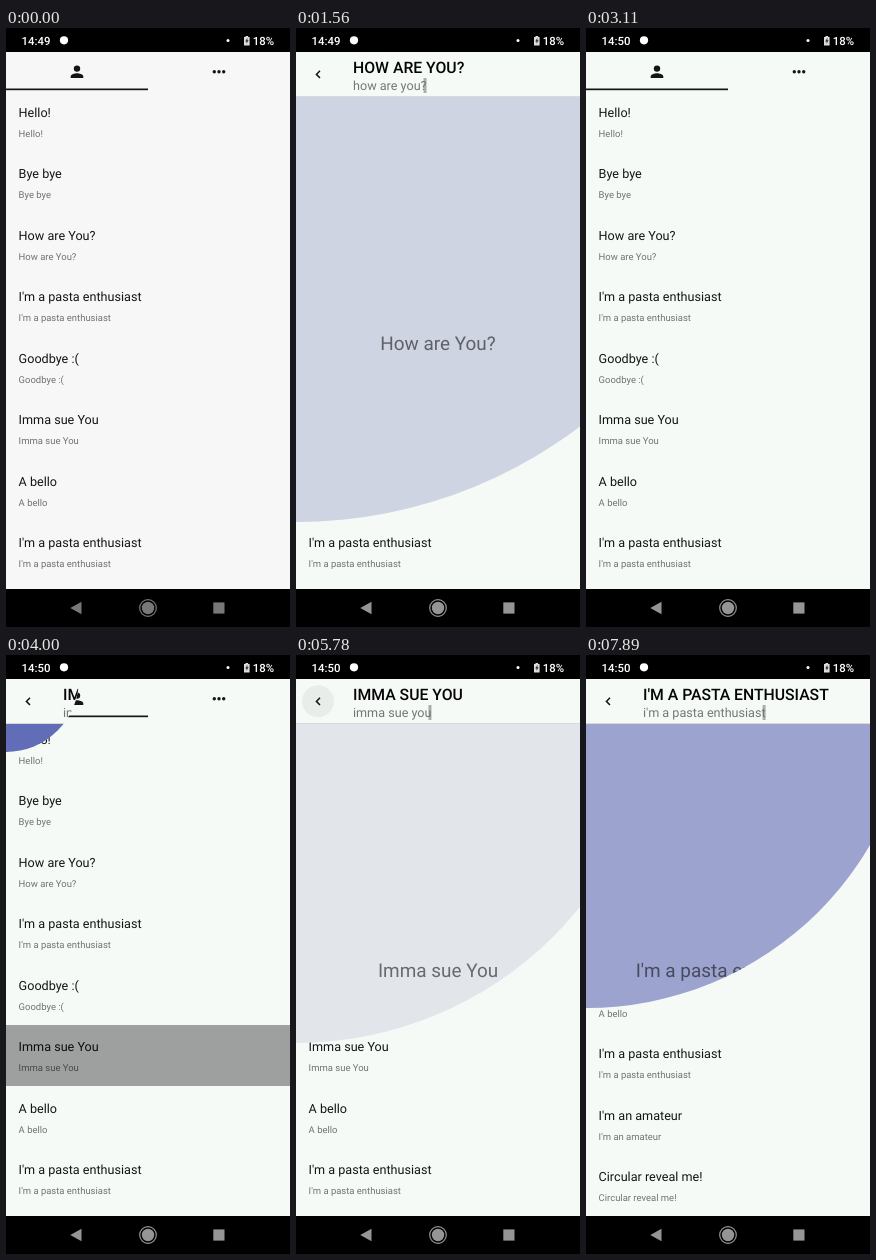
Recreate the animation shown at these times as an HTML page with a canvas. Size 284 by 599 pixels, loop 8000 ms.

```html
<!DOCTYPE html>
<html lang="en">
<head>
<meta charset="utf-8">
<title>Circular reveal</title>
<style>
html, body { margin: 0; overflow: hidden; background: #000; }
canvas { display: block; }
</style>
</head>
<body>
<canvas id="stage" width="284" height="599"></canvas>
<script>
const c = document.getElementById('stage').getContext('2d');
const LOOP = 8000, FPS = 9, W = 284, TOP = 24, BOTTOM = 561;
const ROW = 61.5, LIST_TOP = 62.5, FULL = 528;
const INK = '#141615', SOFT = 'rgba(0,0,0,.54)', NAV = '#959595';
const ROWS = ['Hello!', 'Bye bye', 'How are You?', "I'm a pasta enthusiast", 'Goodbye :(',
  'Imma sue You', 'A bello', "I'm a pasta enthusiast", "I'm an amateur", 'Circular reveal me!'];

// Each visit: tapped row, step of the tap, step at which the way back begins
const VISITS = [
  { row: 2, open: 8, close: 22 },
  { row: 5, open: 34, close: 50 },
  { row: 7, open: 68, close: 99 },
];
const OPEN_R = [0, 0, 73, 329, 390, 434, 470, 503, FULL];
const CLOSE_R = [FULL, 490, 364, 250, 150, 60, 0];
const PRESS = [.12, .3, .36];

const mix = (a, b, m) => `rgb(${a.map((v, i) => Math.round(v + (b[i] - v) * m))})`;

function rect(x, y, w, h, color) {
  c.fillStyle = color;
  c.fillRect(x, y, w, h);
}
function disc(x, y, r, color) {
  c.fillStyle = color;
  c.beginPath();
  c.arc(x, y, r, 0, 7);
  c.fill();
}
function shape(d, color) {
  c.fillStyle = color;
  c.fill(new Path2D(d));
}
function text(s, x, y, size, color, weight = 400, align = 'left') {
  c.font = `${weight} ${size}px Roboto, sans-serif`;
  c.textAlign = align;
  c.fillStyle = color;
  c.fillText(s, x, y);
}
function clipped(path, draw) {
  c.save();
  c.beginPath();
  path();
  c.clip();
  draw();
  c.restore();
}

function drawList(scroll, pressed, alpha, glow) {
  clipped(() => c.rect(0, LIST_TOP, W, BOTTOM - LIST_TOP), () => {
    ROWS.forEach((name, i) => {
      const y = LIST_TOP + ROW * i - scroll;
      text(name, 12.6, y + 26, 12.62, INK);
      text(name, 12.6, y + 46.2, 9.47, SOFT);
      if (i === pressed) rect(0, Math.round(y), W, 61, `rgba(0,0,0,${alpha})`);
    });
    if (glow) disc(142, 1051 - 26 * glow, 490, `rgba(0,0,0,${.045 * glow})`);
  });
}

function drawTabs() {
  disc(71, 40.6, 3.2, INK);
  shape('M64.7 50v-1.6c0-2.1 4.2-3.2 6.3-3.2s6.3 1.1 6.3 3.2v1.6z', INK);
  for (const x of [208.3, 213, 217.7]) disc(x, 43.7, 1.7, INK);
  rect(0, 60.5, 142, 1.7, INK);
}

function drawDetail(name, r, m, bg, backPress) {
  const settled = r >= FULL;
  if (settled) rect(0, TOP, W, BOTTOM - TOP, bg);
  clipped(() => c.arc(0, TOP, r, 0, 7), () => {
    rect(0, 69, W, BOTTOM - 69, mix([92, 104, 180], [240, 243, 241], m));
    text(name, 142, 322.3, 18.93, SOFT, 400, 'center');
    rect(0, TOP, W, 44, bg);
    rect(0, 68, W, 1, '#d6dad8');
    disc(22, 46.3, 16, `rgba(0,0,0,${backPress})`);
    c.strokeStyle = INK;
    c.lineWidth = 1.5;
    c.stroke(new Path2D('M24 42.8l-3.6 3.6l3.6 3.6'));
    text(name.toUpperCase(), 57, 44.6, 15.78, '#050505', 500);
    text(name.toLowerCase(), 57, 62.3, 12.62, '#747775');
    const end = 57 + c.measureText(name.toLowerCase()).width;
    rect(end - 3, 50, 3, 15, 'rgba(110,114,112,.55)');
  });
}

function drawBars(clock, nav) {
  rect(0, 0, W, TOP, '#000');
  text(clock, 15.5, 17, 11.4, '#fff', 500);
  disc(58, 12.3, 4.1, '#fff');
  disc(222, 12.5, 1.5, '#fff');
  rect(239.5, 8, 2.6, 1.5, '#ddd');
  rect(238, 9, 5.6, 8.5, '#ddd');
  shape('M241.4 9.8l-2.2 3.6h1.3v2.4l2.2-3.6h-1.3z', '#333');
  text('18%', 268, 17, 11.4, '#fff', 500, 'right');

  rect(0, BOTTOM, W, 38, '#000');
  shape('M64.3 580l11.2-6.3v12.6z', nav);
  disc(142, 580, 6.2, nav);
  c.strokeStyle = nav;
  c.lineWidth = 1.2;
  c.beginPath();
  c.arc(142, 580, 8.3, 0, 7);
  c.stroke();
  rect(207.3, 574.4, 11.2, 11.2, nav);
}

function render(step) {
  const settle = Math.min(step / 3, 1);
  const bg = mix([247, 247, 247], [245, 250, 247], settle);
  rect(0, 0, W, 599, bg);

  const visit = VISITS.findLast(v => step >= v.open);
  const since = visit ? step - visit.open : 0;
  const back = visit ? step - visit.close : 0;
  const alpha = visit && PRESS[since] || 0;
  const glow = step >= 62 ? Math.max(0, 1 - (step - 62) / 3) : 0;
  drawList(step >= 62 ? 116 : 0, visit && visit.row, alpha, glow);
  drawTabs();

  if (visit) {
    const closing = back >= 0;
    const r = closing ? CLOSE_R[back] || 0 : OPEN_R[Math.min(since, 8)];
    const m = closing ? 1 - (1 - r / FULL) ** 2 : r >= FULL ? 1 : (r / 545) ** 1.7;
    const backPress = closing || step === 49 ? .05 : 0;
    if (r) drawDetail(ROWS[visit.row], r, m, bg, backPress);
  }
  drawBars(step < 25 ? '14:49' : '14:50', mix([120, 120, 120], [149, 149, 149], settle));
}

function tick() {
  const t = performance.now() % LOOP;
  render(Math.floor((t + 5) * FPS / 1000) % (LOOP * FPS / 1000));
  requestAnimationFrame(tick);
}
c.textRendering = 'geometricPrecision';
tick();
</script>
</body>
</html>
```
